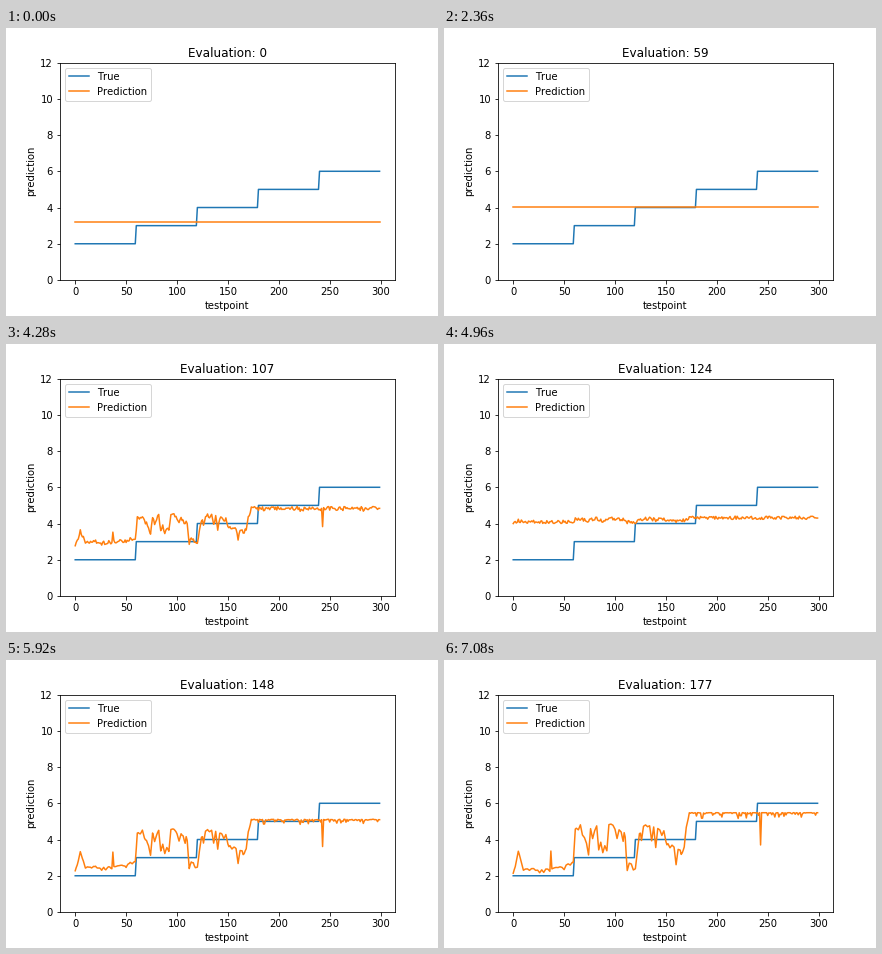
Write a matplotlib script that moves like this. It is 432 px wide and 288 px high and loops after 7.12 s.

```python
import numpy as np
import matplotlib.pyplot as plt
from matplotlib.animation import FuncAnimation

FRAMES, STEP_MS = 178, 40
START, MEAN = 3.2, 4.04
SETTLED, NOISY = 17, 88  # the flat line stops rising, then gains structure
LOW, HIGH = 2.57, 5.4
plt.rcParams.update({"font.family": "DejaVu Sans", "font.size": 10,
                     "text.kerning_factor": 6})

x = np.arange(300)
true = np.repeat([2, 3, 4, 5, 6], 60)
rng = np.random.default_rng(11)
ripple = rng.uniform(-1, 1, 300)


def trained_shape():
    """Noise hanging below a ceiling, scaled so that LOW..HIGH is 0..1."""
    # test point, ceiling, depth of the noise
    at, ceiling, depth = np.transpose([
        (0, 2.4, 0.1), (5, 3.5, 0.3), (10, 2.65, 0.2), (36, 2.6, 0.3),
        (59, 2.95, 0.3), (61, 4.8, 1.7), (109, 4.85, 1.5), (112, 2.9, 0.8),
        (120, 2.9, 0.6), (125, 4.85, 1.2), (148, 4.6, 1.0), (151, 3.9, 1.2),
        (165, 3.6, 1.0), (173, HIGH, 0.3), (299, HIGH, 0.4)])
    drop = np.interp(x, x[::2], rng.random(150) ** 2)
    drop = np.where(x < 173, drop, rng.random(300) ** 6)
    v = np.interp(x, at, ceiling) - np.interp(x, at, depth) * drop
    v[37], v[243] = 3.5, 3.8
    return (v - LOW) / (HIGH - LOW)


shape = trained_shape()

# evaluation, low level, high level
at, lows, highs = np.transpose([
    (NOISY, MEAN, MEAN), (108, 2.9, 4.9), (117, 4.05, 4.32),
    (124, 4.08, 4.32), (148, 2.45, 5.1), (167, LOW, HIGH), (177, 2.33, 5.48)])


def prediction(n):
    if n <= NOISY:
        rest = max(0, 1 - n / SETTLED) ** 2
        return np.full(300, MEAN + (START - MEAN) * rest)
    low, high = np.interp(n, at, lows), np.interp(n, at, highs)
    gain = min(1, (high - low) / (HIGH - LOW))
    jitter = 0.35 * np.sqrt(gain) * (1 - gain) * ripple
    return low + (high - low) * shape + jitter


fig, ax = plt.subplots(figsize=(6, 4), dpi=72)
fig.subplots_adjust(left=0.125, right=0.9, bottom=0.125, top=0.88)
ax.plot(x, true, label="True")
line, = ax.plot(x, prediction(0), label="Prediction")
ax.set_xlim(-14.95, 313.95)
ax.set_ylim(0, 12)
ax.set_xlabel("testpoint")
ax.set_ylabel("prediction")
ax.legend(loc="upper left")
title = ax.set_title("Evaluation: 0")


def update(n):
    line.set_ydata(prediction(n))
    title.set_text(f"Evaluation: {n}")
    return line, title


anim = FuncAnimation(fig, update, frames=FRAMES, interval=STEP_MS,
                     repeat=True, repeat_delay=0)
plt.show()
```
